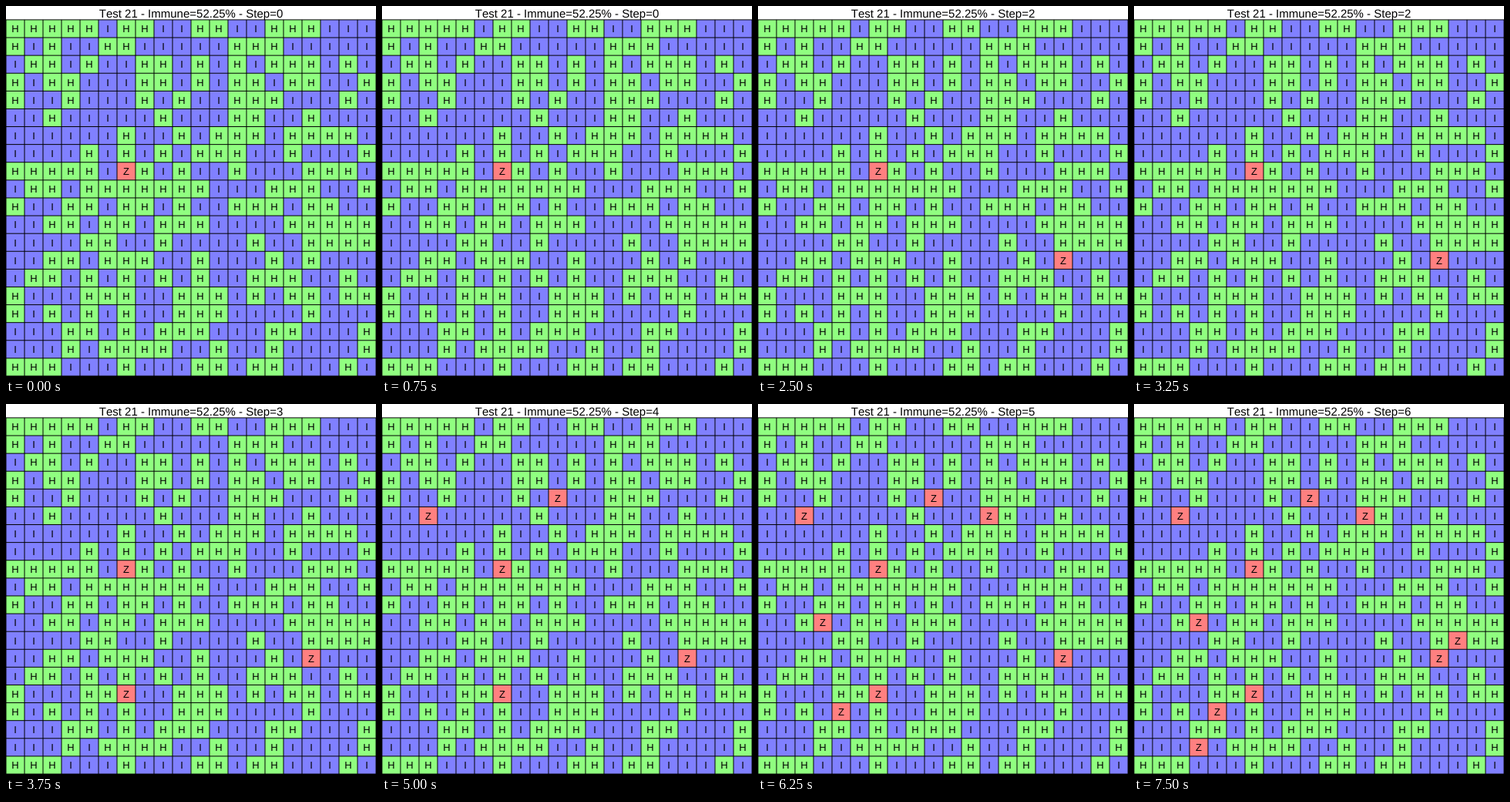
Write an HTML page that moves like this. It is 480 px wide and 480 px high and loops after 8000 ms.

```html
<!DOCTYPE html>
<html lang="en">
<head>
<meta charset="utf-8">
<title>Immunity grid</title>
<style>
  html, body { margin: 0; width: 100%; height: 100%; overflow: hidden; background: #fff; }
  svg { display: block; width: 480px; height: 480px; }
  text {
    font: 13px "Liberation Sans", Arial, sans-serif;
    font-kerning: none;
    text-anchor: middle;
    text-rendering: geometricPrecision;
  }
  #title { font-size: 15px; }
  #lines { stroke: #000; fill: none; }
  rect { shape-rendering: crispEdges; }
  .H rect { fill: #90ff80; }
  .I rect { fill: #8080ff; }
  .Z rect { fill: #ff8080; }
</style>
</head>
<body>
<svg viewBox="0 0 480 480">
  <g id="cells"></g>
  <path id="lines"/>
  <text id="title" x="240" y="15"></text>
</svg>
<script>
const ROWS = `
HHHHHIHHIIHHIIHHHIII
HIHIIHHIIIIIHHHIIIII
IHHIHIIHHIHIHIHHHIHI
HIHHIIIHHIHIHHIHHIIH
HIIHIIIHIHIIHHHIIIHI
IIHIIIIIHIIIHHIIHIII
IIIIIIHIIHIHHHIHHHHI
IIIIHIHIHIHHHIIHIIIH
HHHHHIHHIHIIHIIIHHHI
IHHIHHHHHHHIIIHHHIIH
HIIHHIHHIHIIHHHIHHII
IIHHIHHIHHHIIIIHHHHH
IIIIHHIIHIIIIHIIHHHH
IIHHIHHHIIHIIIHIHIII
IHHIHIHIHIHIIHHHIIHI
HIIIHHHIIHHHIHIHHIHH
HIHIHIHIIHHHIIIIHIII
IIIHHIHIHHHIIIHHIIIH
IIIHIHHHHIIHIIHIIIIH
HHHIIIHIIIHHIHHIIIHI`.trim().split('\n');

// [row, column, step of infection]
const INFECTED = [
  [8, 6, 0], [13, 16, 2], [15, 6, 3], [4, 9, 4], [5, 2, 4],
  [5, 12, 5], [11, 3, 5], [16, 4, 5], [12, 17, 6], [18, 3, 6]
];
const LOOP = 8000, STEP = 1250, SIZE = 480, N = 20;
const TOP = 17.9, W = SIZE / N, H = (SIZE - TOP) / N;

const byId = id => document.getElementById(id);
const rowY = r => TOP + r * H;

function add(parent, tag, attrs) {
  const el = document.createElementNS('http://www.w3.org/2000/svg', tag);
  for (const key in attrs) el.setAttribute(key, attrs[key]);
  return parent.appendChild(el);
}

function setState(cell, state) {
  cell.setAttribute('class', state);
  cell.lastChild.textContent = state;
}

const cells = ROWS.map((row, r) => [...row].map((state, c) => {
  const g = add(byId('cells'), 'g', {});
  add(g, 'rect', { x: c * W, y: rowY(r), width: W, height: H });
  add(g, 'text', { x: c * W + W / 2, y: Math.round(rowY(r + 0.5) + 4.82) });
  setState(g, state);
  return g;
}));

let path = '';
for (let i = 0; i <= N; i++) path += `M${i * W} ${TOP}V${SIZE}M0 ${rowY(i)}H${SIZE}`;
byId('lines').setAttribute('d', path);

let shown = -1;
function draw() {
  const step = Math.floor(performance.now() % LOOP / STEP);
  if (step !== shown) {
    shown = step;
    byId('title').textContent = `Test 21 - Immune=52.25% - Step=${step}`;
    for (const [r, c, from] of INFECTED) setState(cells[r][c], step >= from ? 'Z' : ROWS[r][c]);
  }
  requestAnimationFrame(draw);
}
draw();
</script>
</body>
</html>
```
